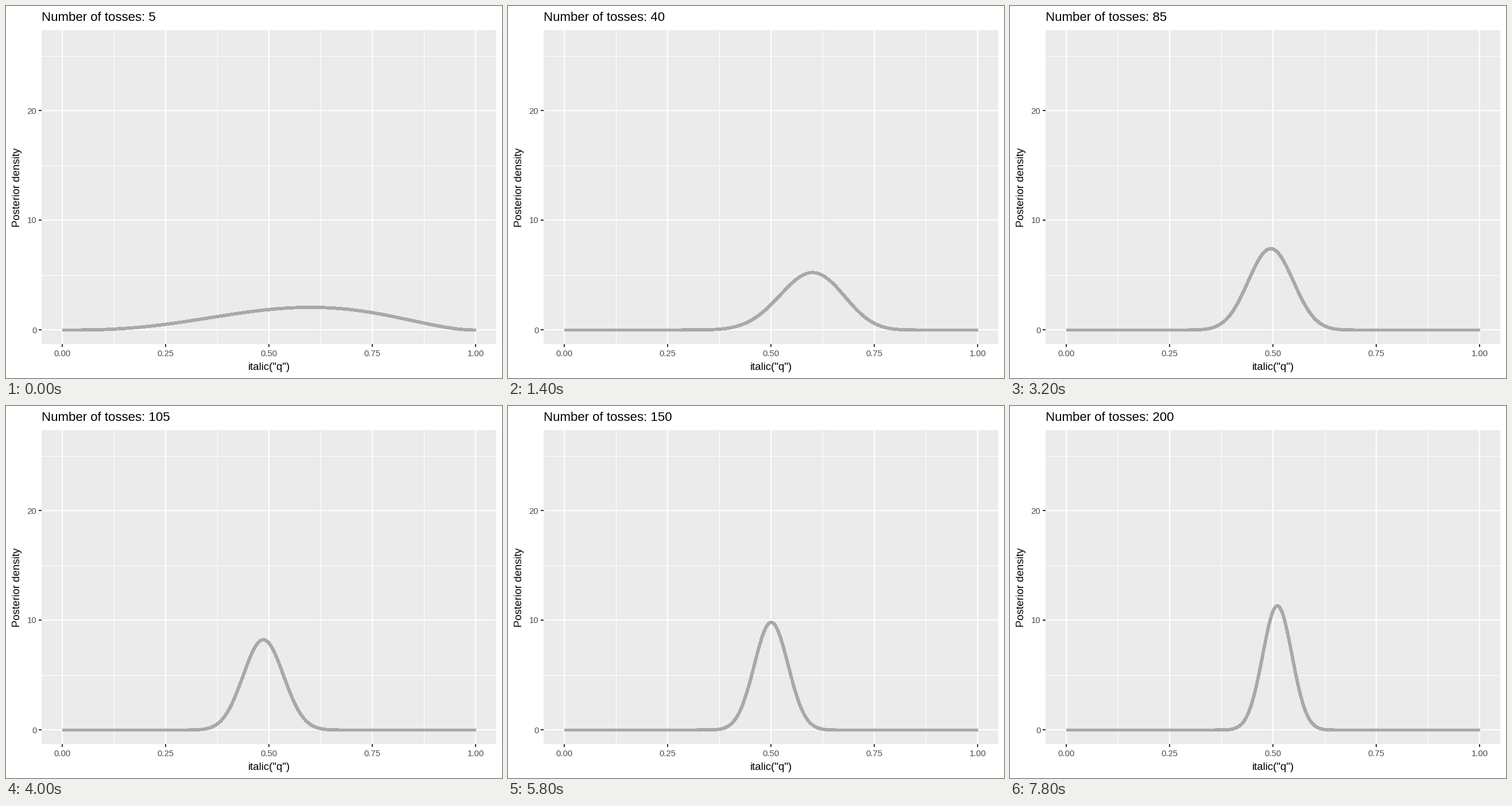
A matplotlib script that plays this animation: 864 by 648 pixels, repeating every 8000 ms.

```python
import math

import matplotlib.pyplot as plt
import numpy as np
from matplotlib.animation import FuncAnimation
from matplotlib.patches import Rectangle

W, H = 864, 648
LEFT, TOP, RIGHT, BOTTOM = 62, 42, 854, 589
BASE = 14 * 96 / 72  # base font size in pixels
STEP = 5

# Running count of heads after every five tosses
HEADS = [3, 6, 9, 12, 16, 19, 22, 24, 26, 27,
         29, 30, 32, 34, 37, 39, 42, 44, 46, 49,
         51, 54, 56, 59, 61, 64, 67, 69, 72, 75,
         78, 80, 83, 85, 88, 91, 94, 97, 99, 102]

plt.rcParams["font.family"] = "Liberation Sans"
fig = plt.figure(figsize=(W / 72, H / 72), dpi=72, facecolor="white")
ax = fig.add_axes([0, 0, 1, 1])
ax.set_xlim(0, W)
ax.set_ylim(H, 0)
ax.axis("off")


def px(q):
    return 98 + 720 * q


def py(d):
    return 564 - 19.1 * d


def segment(x, y, color, width):
    ax.plot(x, y, color=color, lw=width, solid_capstyle="butt")


def label(x, y, text, size, color="black", **kw):
    return ax.text(x, y, text, fontsize=size, color=color, va="baseline", **kw)


def posterior(q, n, k):
    log_c = math.lgamma(n + 2) - math.lgamma(k + 1) - math.lgamma(n - k + 1)
    return np.exp(log_c + k * np.log(q) + (n - k) * np.log1p(-q))


ax.add_patch(Rectangle((LEFT, TOP), RIGHT - LEFT, BOTTOM - TOP,
                       facecolor="#ebebeb", lw=0))

for q in (0.125, 0.375, 0.625, 0.875):
    segment([px(q)] * 2, [TOP, BOTTOM], "white", 1)
for d in (5, 15, 25):
    segment([LEFT, RIGHT], [py(d) + 0.4] * 2, "white", 1)

small = 0.8 * BASE
for q in (0, 0.25, 0.5, 0.75, 1):
    x = px(q)
    segment([x, x], [TOP, BOTTOM], "white", 2)
    segment([x, x], [BOTTOM, BOTTOM + 4.7], "#333333", 2)
    label(x + 0.3, 609.5, f"{q:.2f}", small, "#4d4d4d", ha="center")
for d in (0, 10, 20):
    y = py(d)
    segment([LEFT, RIGHT], [y, y], "white", 2)
    segment([LEFT - 4.7, LEFT], [y, y], "#333333", 2)
    label(53.3, y + 5.5, str(d), small, "#4d4d4d", ha="right")

label(458.3, 634, 'italic("q")', BASE, ha="center")
label(24, 315.5, "Posterior density", BASE, rotation=90,
      rotation_mode="anchor", ha="center")
title = label(62, 26, "", 22.2, ha="left")

grid = np.linspace(1e-9, 1 - 1e-9, 501)
curve, = ax.plot([], [], color="#a9a9a9", lw=4.8, antialiased=False,
                 solid_capstyle="butt", solid_joinstyle="round")


def update(i):
    n = STEP * (i + 1)
    density = posterior(grid, n, HEADS[i])
    curve.set_data(px(grid) + 0.5, py(density) + 0.5)  # pixel centres
    title.set_text(f"Number of tosses: {n}")
    return curve, title


anim = FuncAnimation(fig, update, frames=len(HEADS), interval=200,
                     repeat=True, repeat_delay=0)
plt.show()
```
